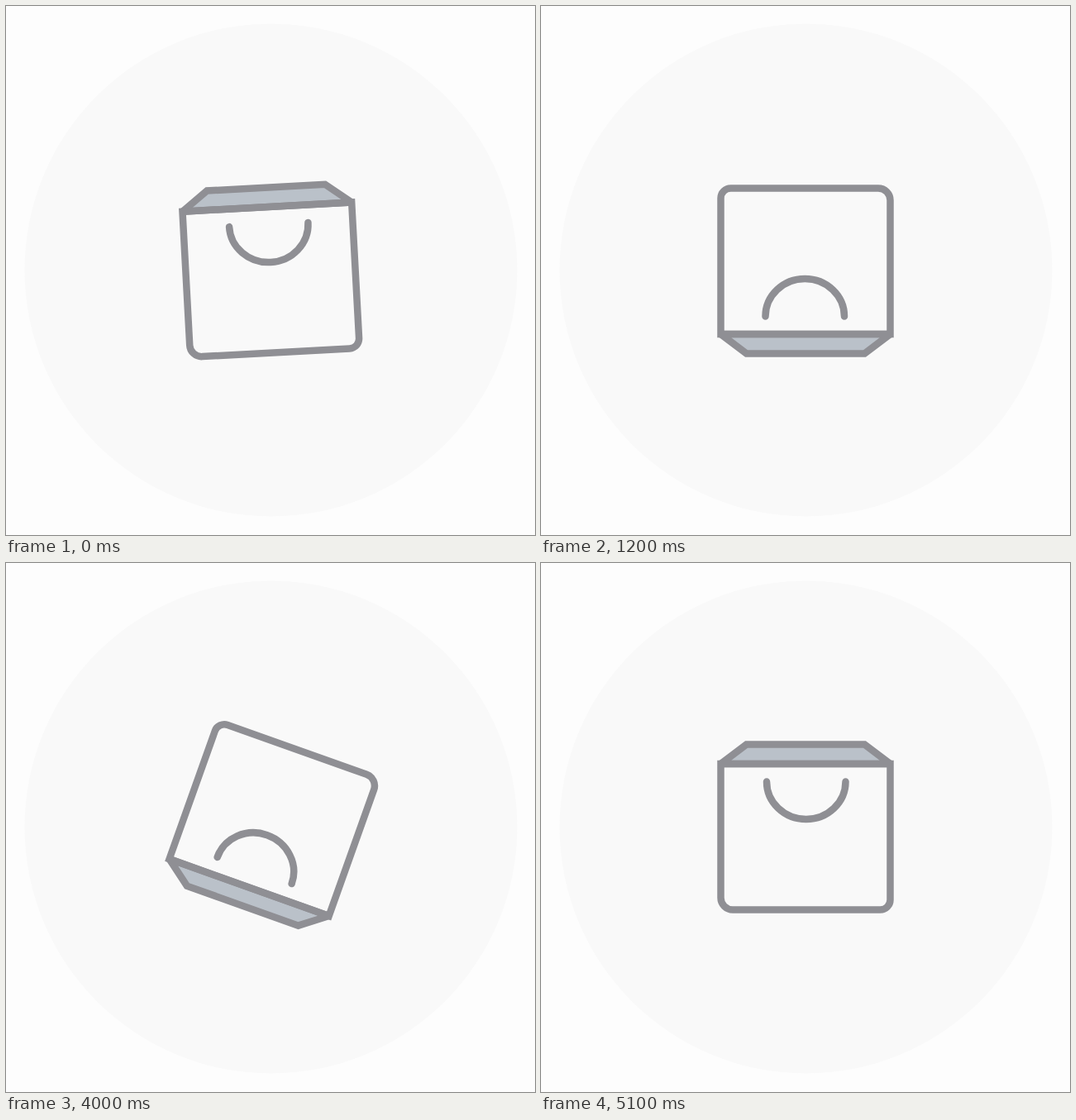
Animation, 640 px wide and 640 px high, one loop 6000 ms. Source, as an HTML page:

```html
<!DOCTYPE html>
<html lang="en">
<head>
<meta charset="utf-8">
<title>Bag</title>
<style>
  html, body { margin: 0; height: 100%; overflow: hidden; background: #fdfdfd; }
  svg { display: block; width: 100vw; height: 100vh; }
  #bag { fill: none; stroke: #8f8f94; stroke-width: 8.5; stroke-miterlimit: 3; }
  .round { stroke-linecap: round; }
  .face { stroke: #eb6268; }
</style>
</head>
<body>
<svg viewBox="0 0 640 640">
  <circle cx="320.5" cy="319.5" r="298" fill="#f9f9f9"/>
  <g id="bag">
    <path fill="#bac1c9" d="M217.5 243L248.5 219.5H391.5L422.5 243Z"/>
    <path d="M217.5 243V405A14.5 14.5 0 0 0 232 419.5H410.5A12 12 0 0 0 422.5 407.5V243Z"/>
    <path class="round" d="M368.5 264.5A47.75 45.5 0 0 1 273 264.5"/>
    <g class="round face">
      <path pathLength="1" d="M368.5 264.5A47.75 45.5 0 0 1 273 264.5"/>
      <path pathLength="1" d="M344 375V338"/>
      <path pathLength="1" d="M300.3 375V338"/>
    </g>
  </g>
</svg>
<script>
const LOOP = 6000, STEP = 100;
const bag = document.getElementById('bag');
const strokes = document.querySelectorAll('.face path');

// [time, angle]: wind back, swing over, settle; then the same in reverse
const turn = [
  [-52, 0], [157, -20], [1007, 185], [1170, 180],
  [3808, 180], [4017, 200], [4867, -5], [5030, 0], [LOOP, 0]
];
// [draw start, erase start] for mouth, left eye, right eye
const trims = [[1410, 3410], [1450, 3438], [1515, 3490]];
const DRAW = 660, ERASE = 400;

function ease(t, start, length) {
  const u = Math.min(1, Math.max(0, (t - start) / length));
  return u * u * (3 - 2 * u);
}

function angleAt(t) {
  const i = turn.findIndex(key => key[0] > t);
  const [t0, a0] = turn[i - 1], [t1, a1] = turn[i];
  return a0 + (a1 - a0) * ease(t, t0, t1 - t0);
}

function render(now) {
  const t = Math.floor(now % LOOP / STEP) * STEP;
  bag.setAttribute('transform', `rotate(${angleAt(t)} 320 320)`);
  strokes.forEach((path, i) => {
    const [start, end] = trims[i];
    const shown = ease(t, start, DRAW) - ease(t, end, ERASE);
    path.style.visibility = shown > 0 ? 'visible' : 'hidden';
    path.style.strokeDasharray = `${shown} 2`;
  });
}

const begin = performance.now();
function tick() {
  render(performance.now() - begin);
  requestAnimationFrame(tick);
}
tick();
</script>
</body>
</html>
```
